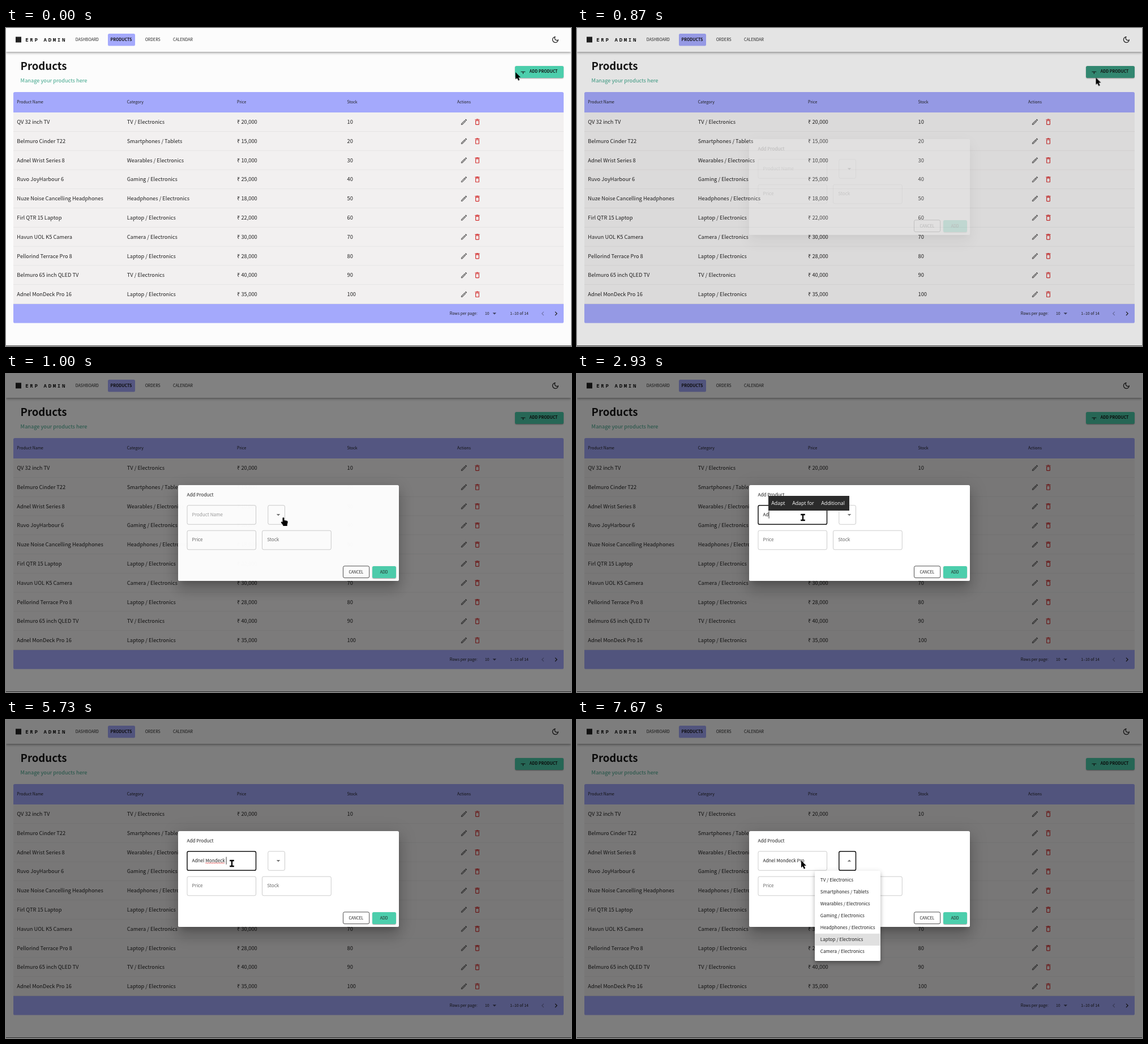
Write an HTML page that moves like this. It is 998 by 561 pixels and loops after 8 s.

```html
<!DOCTYPE html>
<html lang="en">
<head>
<meta charset="utf-8">
<title>Products</title>
<style>
  html, body { margin: 0; width: 100%; height: 100%; overflow: hidden; background: #fcfcfc; }
  body { position: relative; font-family: "Noto Sans CJK SC", "Noto Sans CJK JP", "Noto Sans CJK", sans-serif; }
  div, svg { position: absolute; }
  svg { overflow: visible; }
  text { fill: #222; white-space: pre; }
  .s { font-size: 6.96px; }
  .m { font-size: 8.13px; }
  .l { font-size: 9.29px; }
  .xl { font-size: 18.57px; }
  .b { font-weight: 700; fill: #141414; }
  .brand { font: 600 9.1px "Noto Sans Mono", monospace; letter-spacing: 2.62px; fill: #141414; }
  .soft { fill: rgba(0,0,0,.6); }
  .hint { fill: rgba(0,0,0,.4); }
  .green { fill: #3da58a; }
  .full { left: 0; top: 0; width: 998px; height: 561px; }

  .nav { left: 0; top: 0; width: 998px; height: 41.5px; background: #fcfcfc;
    box-shadow: 0 1.3px 2.6px -.65px rgba(0,0,0,.2), 0 2.6px 3.3px rgba(0,0,0,.14), 0 .65px 6.5px rgba(0,0,0,.12); }
  .button { background: #4cceac; border-radius: 2.6px;
    box-shadow: 0 2px 1.3px -1.3px rgba(0,0,0,.2), 0 1.3px 1.3px rgba(0,0,0,.14), 0 .65px 3.3px rgba(0,0,0,.12); }
  .open { left: 899px; top: 66.5px; width: 86px; height: 21.5px; animation: hover 8s infinite; }
  .save { left: 343px; top: 142.5px; width: 41.5px; height: 21.5px; }

  .shade { background: rgba(0,0,0,.5); animation: appear 8s infinite; }
  .dialog { left: 304px; top: 196px; width: 390px; height: 169px; background: #fff; border-radius: 2.6px;
    box-shadow: 0 7px 10px -4.5px rgba(0,0,0,.2), 0 15.6px 24.7px 2px rgba(0,0,0,.14), 0 6px 30px 5px rgba(0,0,0,.12);
    animation: appear 8s infinite; }
  .field { fill: none; stroke: rgba(0,0,0,.25); stroke-width: .8; }
  .field.hover { stroke: rgba(0,0,0,.87); }
  .field.focus { stroke: #111; stroke-width: 1.5; }

  .menu { left: 420px; top: 265.5px; width: 115.5px; height: 158.5px; background: #fff; border-radius: 2.6px;
    box-shadow: 0 3.3px 3.3px -2px rgba(0,0,0,.2), 0 5.2px 6.5px .65px rgba(0,0,0,.14), 0 2px 9px 1.3px rgba(0,0,0,.12);
    transform-origin: 50% 0; animation: grow 8s infinite; }

  #popup { top: 215px; height: 26px; display: flex; align-items: center; gap: 12.5px; padding: 0 8px 0 5.5px;
    background: #2b2b2b; color: #fff; font: 8.8px "Open Sans", "Noto Sans", sans-serif; white-space: nowrap; }
  .fruit { width: 8px; height: 8px; margin: 0 2px; border-radius: 50%; background: #a9ba3c; }

  .cursor { animation: travel 8s infinite; }
  .arrow { animation: arrow 8s step-end infinite; }
  .hand { animation: hand 8s step-end infinite; }
  .beam { animation: beam 8s step-end infinite; }

  @keyframes hover {
    0%, .875% { background: #4cceac; }
    3.375%, 10.25% { background: #2e7c67; }
    13.375%, 100% { background: #4cceac; }
  }
  @keyframes appear {
    0% { opacity: 0; }
    10.25% { opacity: 0; animation-timing-function: cubic-bezier(.4,0,.2,1); }
    13.0625%, 100% { opacity: 1; }
  }
  @keyframes grow {
    0% { opacity: 0; transform: scale(.75,.5625); }
    85.875% { opacity: 0; transform: scale(.75,.5625); animation-timing-function: cubic-bezier(.4,0,.2,1); }
    89%, 100% { opacity: 1; transform: none; }
  }
  @keyframes travel {
    0%, .875% { transform: translate(900px,78px); }
    3.375%, 10.875% { transform: translate(918px,87px); }
    12.5% { transform: translate(490px,253px); }
    15% { transform: translate(446px,268px); }
    16.625% { transform: translate(428px,268px); }
    18.375%, 100% { transform: translate(399px,253px); }
  }
  @keyframes arrow {
    0% { opacity: 1; } .875% { opacity: 0; } 10% { opacity: 1; } 12% { opacity: 0; }
    13.375% { opacity: 1; } 16.625% { opacity: 0; } 85.875%, 100% { opacity: 1; }
  }
  @keyframes hand {
    0% { opacity: 0; } .875% { opacity: 1; } 10% { opacity: 0; } 12% { opacity: 1; } 13.375%, 100% { opacity: 0; }
  }
  @keyframes beam {
    0% { opacity: 0; } 16.625% { opacity: 1; } 85.875%, 100% { opacity: 0; }
  }
</style>
</head>
<body>
<div class="nav"></div>
<div class="button open"></div>
<svg class="full" id="page" viewBox="0 0 998 561"></svg>
<div class="full shade"></div>

<div class="dialog">
  <div class="button save"></div>
  <svg width="390" height="169" viewBox="304 196 390 169">
    <text class="m" x="319.5" y="216.2">Add Product</text>
    <rect class="field" id="name" x="320" y="231.7" width="121.5" height="33.6" rx="2.6"/>
    <rect class="field" id="select" x="462.8" y="231.7" width="29.7" height="33.6" rx="2.6"/>
    <rect class="field" x="320" y="276.2" width="121.5" height="33.6" rx="2.6"/>
    <rect class="field" x="452.5" y="276.2" width="121.8" height="33.6" rx="2.6"/>
    <rect class="field hover" x="595.5" y="338.8" width="46.2" height="20.8" rx="2.6"/>
    <text class="m hint" id="hint" x="328.6" y="251.2">Product Name</text>
    <text class="m" id="typed" x="328.6" y="251.2"></text>
    <path id="squiggle" fill="none" stroke="#e03030" stroke-width=".8"/>
    <path id="caret" stroke="#111" stroke-width=".8"/>
    <path id="drop" d="M477.8 247L481 250.2 484.3 247Z" fill="rgba(0,0,0,.56)"/>
    <text class="m soft" x="328.6" y="295.4">Price</text>
    <text class="m soft" x="461.2" y="295.4">Stock</text>
    <text class="s" x="605.4" y="351.5">CANCEL</text>
    <text class="s" x="660.7" y="351.5">ADD</text>
  </svg>
</div>

<div id="popup"></div>
<div class="menu">
  <svg width="115.5" height="158.5" viewBox="420 265.5 115.5 158.5">
    <rect id="active" x="420" y="271" width="115.5" height="21.1" fill="#e0e0e0"/>
    <g id="options"></g>
  </svg>
</div>

<svg class="full" viewBox="0 0 998 561">
  <g class="cursor">
    <path class="arrow" id="pointer" d="M0 0V12.5L2.8 9.9 4.9 14.8 7.2 13.8 5.1 9H9Z"/>
    <path class="hand" d="M-1.4 .8Q0 -.6 1.4 .8V5L6 5.8Q8 6.2 7.8 8.4L6.8 12.5V15H-.6V13.4L-4.2 9Q-4 6.8-2.4 7.6L-1.4 8.4Z"/>
    <path class="beam" d="M-3.8-5H3.8M-3.8 5H3.8M0-5V5" fill="none" stroke="#000" stroke-width="2.3"/>
  </g>
</svg>

<script>
const $ = id => document.getElementById(id);
const text = (x, y, str, cls) => `<text class="${cls}" x="${x}" y="${y}">${str}</text>`;
const icon = (x, y, scale, fill, d) =>
  `<path transform="translate(${x} ${y}) scale(${scale}) translate(-12 -12)" fill="${fill}" d="${d}"/>`;
const box = (x, y, w, h, fill, rx = 0) =>
  `<rect x="${x}" y="${y}" width="${w}" height="${h}" rx="${rx}" fill="${fill}"/>`;

const PENCIL = "M14.06 9.02l.92.92L5.92 19H5v-.92l9.06-9.06M17.66 3c-.25 0-.51.1-.7.29l-1.83 1.83 3.75 3.75 1.83-1.83c.39-.39.39-1.02 0-1.41l-2.34-2.34c-.2-.2-.45-.29-.71-.29zm-3.6 3.19L3 17.25V21h3.75L17.81 9.94l-3.75-3.75z";
const BIN = "M6 19c0 1.1.9 2 2 2h8c1.1 0 2-.9 2-2V7H6v12zM8 9h8v10H8V9zm7.5-5l-1-1h-5l-1 1H5v2h14V4h-3.5z";
const MOON = "M9.37 5.51c-.18.64-.27 1.31-.27 1.99 0 4.08 3.32 7.4 7.4 7.4.68 0 1.35-.09 1.99-.27C17.45 17.19 14.93 19 12 19c-3.86 0-7-3.14-7-7 0-2.93 1.81-5.45 4.37-6.49zM12 3c-4.97 0-9 4.03-9 9s4.03 9 9 9 9-4.03 9-9c0-.46-.04-.92-.1-1.36-.98 1.37-2.58 2.26-4.4 2.26-2.98 0-5.4-2.42-5.4-5.4 0-1.81.89-3.42 2.26-4.4-.44-.06-.9-.1-1.36-.1z";

const categories = ["TV / Electronics", "Smartphones / Tablets", "Wearables / Electronics", "Gaming / Electronics",
  "Headphones / Electronics", "Laptop / Electronics", "Camera / Electronics"];

// name, category index, price in thousands
const products = [
  ["QV 32 inch TV", 0, 20],
  ["Belmuro Cinder T22", 1, 15],
  ["Adnel Wrist Series 8", 2, 10],
  ["Ruvo JoyHarbour 6", 3, 25],
  ["Nuze Noise Cancelling Headphones", 4, 18],
  ["Firl QTR 15 Laptop", 5, 22],
  ["Havun UOL K5 Camera", 6, 30],
  ["Pellorind Terrace Pro 8", 5, 28],
  ["Belmuro 65 inch QLED TV", 0, 40],
  ["Adnel MonDeck Pro 16", 5, 35]
];
const columns = [19.3, 213.7, 408, 602.5, 797];
const LILAC = "#a4a9fc", ROW = 33.78;

const row = ([name, category, price], i) => {
  const mid = 165.8 + i * ROW, y = mid + 3.3;
  const cells = [name, categories[category], `₹ ${price},000`, (i + 1) * 10];
  return cells.map((cell, c) => text(columns[c], y, cell, "l")).join("")
    + icon(809, mid, .57, "rgba(0,0,0,.6)", PENCIL)
    + icon(832.5, mid, .58, "#d32f2f", BIN)
    + box(13, 149 + (i + 1) * ROW - .7, 972, .7, "#e0e0e0");
};

$("page").innerHTML =
  box(17, 15.5, 10, 10, "#222") + text(34.3, 24, "ERP ADMIN", "brand")
  + box(180, 10, 48, 21.5, LILAC, 2.6)
  + text(122.7, 23, "DASHBOARD", "s") + text(184.6, 23, "PRODUCTS", "s b")
  + text(245.7, 23, "ORDERS", "s") + text(295, 23, "CALENDAR", "s")
  + icon(970.4, 20.6, .62, "#222", MOON)
  + text(25.5, 73.5, "Products", "xl b")
  + text(25.6, 96.3, "Manage your products here", "l green")
  + icon(913.4, 77.2, .56, "#141414", "M19 13h-6v6h-2v-6H5v-2h14z")
  + text(924.8, 79.4, "ADD PRODUCT", "s b")
  + box(13, 113, 972, 407.5, LILAC, 2.6) + box(13, 149, 972, 10 * ROW, "#f2f0f0")
  + ["Product Name", "Category", "Price", "Stock", "Actions"].map((h, i) => text(columns[i], 133, h, "s")).join("")
  + products.map(row).join("")
  + text(783.8, 506.2, "Rows per page:", "s") + text(846, 506.2, "10", "s")
  + icon(862.8, 503.6, .65, "rgba(0,0,0,.6)", "M7 10l5 5 5-5z")
  + text(890.3, 506.2, "1–10 of 14", "s")
  + icon(948.2, 503.8, .6, "rgba(0,0,0,.3)", "M15.41 7.41L14 6l-6 6 6 6 1.41-1.41L10.83 12z")
  + icon(971.6, 503.8, .6, "#222", "M10 6L8.59 7.41 13.17 12l-4.58 4.59L10 18l6-6z")
  + box(0, 560, 998, 1, "#555");

const PITCH = 21.08;
$("options").innerHTML = categories.map((c, i) => text(429.8, 284.5 + i * PITCH, c, "m")).join("");

const PHRASE = "Adnel Mondeck Pro", TEXT_X = 328.6;
// time, characters typed
const keys = [[1670, 0], [2530, 1], [2730, 2], [3600, 3], [3870, 4], [4000, 5], [4070, 6], [4400, 7], [4670, 8],
  [5200, 9], [5470, 11], [5530, 13], [5730, 14], [5930, 15], [6000, 16], [6070, 17]];
// time, characters before the popup, suggestions
const hints = [[2670, 1, "A lot|And|As"], [2870], [2930, 2, "Adapt|Adapt for|Additional"],
  [3730, 3, "Administer|Adjacent|Advice"], [4000], [4200, 6, "*|has|is"], [4530, 7, "Maybe|Monday|More"],
  [4800, 8, "Monday|Moment|More"], [5270, 9, "Monday|Months|Money"], [5530], [6130, 17, "with|and"], [6330]];
const moves = [[7270, 1], [7400, 2], [7470, 3], [7530, 4], [7670, 5]];
const FOCUS = 1670, BLUR = 6330, OPEN = 6870;

const latest = (list, t) => list.filter(([at]) => at <= t).pop() || [0, 0];

const measure = n => {
  $("typed").textContent = PHRASE.slice(0, n);
  return n ? $("typed").getComputedTextLength() : 0;
};

function wave(from, to) {
  let d = `M${from} 253`;
  for (let x = from + 1.3, i = 0; x <= to; x += 1.3, i++) d += `L${x} ${i % 2 ? 253 : 251.8}`;
  return d;
}

let popupKey;
function drawPopup(t) {
  const [at, count, words] = latest(hints, t);
  if (at === popupKey) return;
  popupKey = at;
  const popup = $("popup");
  popup.style.visibility = words ? "visible" : "hidden";
  if (!words) return;
  popup.style.left = TEXT_X + measure(count) - .8 + "px";
  popup.innerHTML = words.split("|").map(w => w === "*" ? '<span class="fruit"></span>' : `<span>${w}</span>`).join("");
}

function draw(t) {
  drawPopup(t);
  const [keyTime, count] = latest(keys, t);
  const focused = t >= FOCUS && t < BLUR;
  const caretX = TEXT_X + measure(count) + .5;
  $("hint").style.visibility = count ? "hidden" : "visible";
  $("name").setAttribute("class", "field" + (focused ? " focus" : t >= 1330 && t < OPEN ? " hover" : ""));
  $("select").setAttribute("class", "field" + (t >= BLUR ? " focus" : ""));

  const lit = focused && Math.floor((t - keyTime) / 530) % 2 === 0;
  $("caret").setAttribute("d", lit ? `M${caretX} 241.5V254.8` : "");

  let line = "";
  if (focused && count >= 14) {
    line = wave($("typed").getStartPositionOfChar(6).x, $("typed").getEndPositionOfChar(12).x);
  }
  $("squiggle").setAttribute("d", line);

  $("drop").setAttribute("transform", t >= OPEN ? "rotate(180 481 248.4)" : "");
  $("pointer").setAttribute("transform", t >= OPEN ? "translate(-3 -5)" : "");
  $("active").setAttribute("y", 271 + latest(moves, t)[1] * PITCH);
}

let start;
function tick(now) {
  start ??= now;
  draw((now - start) % 8000);
  requestAnimationFrame(tick);
}
draw(0);
requestAnimationFrame(tick);
</script>
</body>
</html>
```
